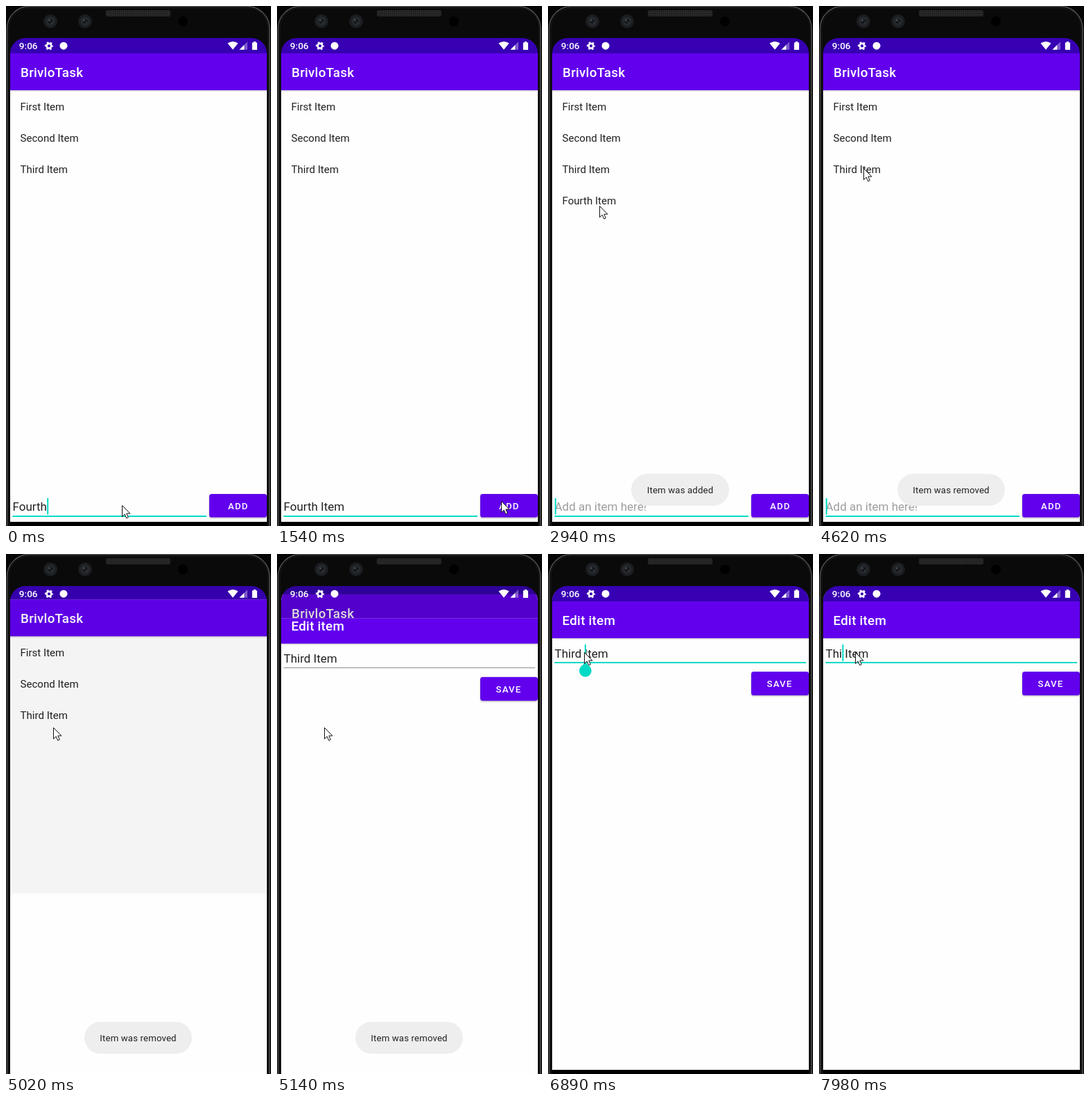
Animation, 382 px wide and 747 px high, one loop 8000 ms. Source, as an HTML page:

```html
<!DOCTYPE html>
<html lang="en">
<head>
<meta charset="utf-8">
<title>To-do list</title>
<style>
  html, body { margin: 0; width: 100%; height: 100%; overflow: hidden; background: #000; }
  svg { display: block; width: 100%; height: 100%; }
  text { font-family: Roboto, "Open Sans", sans-serif; fill: #212121; white-space: pre; }
  .title { font-size: 18.85px; font-weight: 500; letter-spacing: .23px; fill: #fff; }
  .row { font-size: 15.07px; }
  .field { font-size: 17px; }
  .hint { fill: #9e9e9e; }
  .label { font-size: 13.2px; font-weight: 500; letter-spacing: 1.18px; fill: #fff; }
  .toast { font-size: 13.2px; letter-spacing: .15px; text-anchor: middle; }
  .clock { font-size: 13.6px; font-weight: 500; fill: #fff; }
  .bar { fill: #6200ee; filter: drop-shadow(0 1px 1px rgba(0,0,0,.22)); }
  .button { fill: #6200ee; filter: drop-shadow(0 1px 1px rgba(0,0,0,.35)); }
</style>
</head>
<body>
<svg viewBox="0 0 382 747" preserveAspectRatio="none">
  <defs>
    <clipPath id="screen"><path d="M6 747V68a22 22 0 0 1 22-22H354a22 22 0 0 1 22 22V747z"/></clipPath>
    <clipPath id="reveal"><rect id="revealBox" x="0" y="46" width="382" height="701"/></clipPath>
    <pattern id="mesh" width="3" height="3" patternUnits="userSpaceOnUse">
      <rect width="3" height="3" fill="#2c2c2c"/><circle cx="1.5" cy="1.5" r=".9" fill="#151515"/>
    </pattern>
    <g id="camera">
      <circle r="10" fill="#1b1d20"/><circle r="6.5" fill="#262a2e"/>
      <circle r="3.6" fill="#15181b"/><circle cx="-1.6" cy="-1.6" r="1.3" fill="#4a5056"/>
      <circle cx="2" cy="2" r="1" fill="#3a4046"/>
    </g>
    <g id="chrome">
      <rect x="6" y="68" width="370" height="673" fill="#fefefe"/>
      <rect x="6" y="46" width="370" height="22" fill="#3700b3"/>
      <rect class="bar" x="6" y="68" width="370" height="53"/>
    </g>
  </defs>

  <!-- phone body -->
  <rect width="382" height="747" fill="#050505"/>
  <rect x="1.5" y=".5" width="378.5" height="800" rx="32" fill="#0a0a0a" stroke="#565656" stroke-width="1.4"/>
  <rect x="4" y="3" width="374" height="800" rx="29" fill="none" stroke="#1c1c1c"/>
  <rect x="144" y="6" width="93" height="9" rx="2" fill="url(#mesh)"/>
  <use href="#camera" x="64" y="22"/>
  <use href="#camera" x="114" y="22"/>
  <circle cx="255" cy="22" r="7" fill="#000"/>
  <rect x="6" y="741" width="370" height="6" fill="#000"/>

  <g clip-path="url(#screen)">
    <g id="home">
      <use href="#chrome"/>
      <text class="title" x="21" y="102">BrivloTask</text>
      <text class="row" x="20.5" y="149.5">First Item</text>
      <text class="row" x="20.5" y="194.7">Second Item</text>
      <text class="row" x="20.5" y="239.9">Third Item</text>
      <text class="row" x="20.5" y="285.1" id="fourth">Fourth Item</text>
      <text class="field" x="9.5" y="725" id="entry"></text>
      <rect x="9.5" y="732" width="279.5" height="2" fill="#03dac5"/>
      <rect id="homeCaret" y="707" width="2" height="23.5" fill="#03dac5"/>
      <rect class="button" x="293" y="701" width="83" height="33.5" rx="3.6"/>
      <rect id="ripple" x="293" y="701" width="83" height="33.5" rx="3.6" fill="#fff"/>
      <text class="label" x="320" y="723">ADD</text>
      <rect id="scrim" x="0" y="46" width="382" height="701"/>
    </g>
    <g id="edit" clip-path="url(#reveal)">
      <g id="editPage">
        <use href="#chrome"/>
        <text class="title" x="20.5" y="102">Edit item</text>
        <text class="field" x="9.5" y="148.5" id="value"></text>
        <rect id="line" x="9.5" width="362.5"/>
        <rect id="editCaret" y="130" width="2" height="24" fill="#03dac5"/>
        <path id="handle" d="M0 0L6.4 5.4A8.9 8.9 0 1 1 -6.4 5.4Z" fill="#03dac5"/>
        <rect class="button" x="293" y="169" width="83" height="34" rx="3.6"/>
        <text class="label" x="315.5" y="191">SAVE</text>
      </g>
    </g>
  </g>

  <!-- status icons -->
  <text class="clock" x="18.8" y="62.3">9:06</text>
  <g transform="translate(62 57.3)" fill="none" stroke="#fff">
    <circle r="3.4" stroke-width="2.6"/>
    <circle r="5.2" stroke-width="1.8" stroke-dasharray="2.7 2.745" stroke-dashoffset="1.35"/>
  </g>
  <circle cx="83" cy="57.2" r="5.5" fill="#fff"/>
  <path d="M319.5 53.6Q327 48.4 334.5 53.6L327 62.8z" fill="#fff"/>
  <path d="M348 51.2V62.8H336.4z" fill="#fff" opacity=".35"/>
  <path d="M343.3 55.9V62.8H336.4z" fill="#fff"/>
  <path d="M354.8 52.4H356.8V51H360V52.4H362V63H354.8z" fill="#fff"/>

  <g id="added">
    <rect x="120" y="672" width="141" height="46" rx="23" fill="#eee"/>
    <text class="toast" x="190.5" y="700">Item was added</text>
  </g>
  <g id="removed">
    <rect x="113" y="672" width="155" height="46" rx="23" fill="#eee"/>
    <text class="toast" x="190.5" y="700">Item was removed</text>
  </g>
  <path id="mouse" d="M.5 .5V16.6L4.2 13.1L6.7 18.8L9.3 17.7L6.8 12.1H11.9z"
        fill="#fff" stroke="#111" stroke-width="1" stroke-linejoin="round"/>
</svg>
<script>
const LOOP = 8000, BLINK = 495, TEXT_X = 9.8;

const stamps = [
  0, 150, 290, 430, 570, 710, 1140, 1420, 1540, 1660, 1800, 1940, 2080, 2220, 2360,
  2510, 2660, 2940, 3220, 3650, 3790, 3930, 4080, 4220, 4620, 5020, 5140, 5290, 5420,
  5550, 5680, 5820, 5950, 6080, 6230, 6370, 6500, 6630, 6760, 6890, 7170, 7440, 7580,
  7800, 7980
];
// Time, x, y of the pointer.
const path = [
  [1140, 167, 717], [1420, 262, 721], [1540, 323, 711], [1800, 323, 711],
  [1940, 306, 640], [2080, 240, 480], [2220, 160, 360], [2360, 101, 300],
  [2660, 83, 290], [2940, 74, 287], [3930, 74, 287], [4220, 64, 233],
  [4620, 64, 233], [5020, 68, 249], [5290, 68, 249], [5680, 50, 160],
  [5950, 45, 145], [6080, 45, 145], [6370, 52, 141]
];
const keyTimes = [150, 290, 430, 570, 710];
const blinkStarts = [0, 640, 1640, 6620, 7440, 7800];

const ui = {};
document.querySelectorAll("svg [id]").forEach(el => ui[el.id] = el);
const pen = document.createElement("canvas").getContext("2d");

const clamp = v => Math.max(0, Math.min(1, v));
const last = (list, t) => list.filter(v => v <= t).pop();
const set = (el, name, v) => el.setAttribute(name, v);
const show = (el, on) => set(el, "visibility", on ? "visible" : "hidden");
const move = (el, x, y) => set(el, "transform", `translate(${x} ${y})`);
const fade = (t, a, b, c, d) => clamp((t - a) / (b - a)) * clamp((d - t) / (d - c));

function caretX(text) {
  pen.font = "17px Roboto, 'Open Sans', sans-serif";
  return TEXT_X + pen.measureText(text).width;
}

function pointer(t) {
  const i = path.findIndex(p => p[0] > t);
  if (i === 0) return path[0].slice(1);
  if (i < 0) return path[path.length - 1].slice(1);
  const [a, b] = [path[i - 1], path[i]];
  const k = (t - a[0]) / (b[0] - a[0]);
  return [a[1] + (b[1] - a[1]) * k, a[2] + (b[2] - a[2]) * k];
}

function drawHome(t, caretOn) {
  const typed = t < 1800 ? "Fourth Item".slice(0, 6 + keyTimes.filter(k => k <= t).length) : "";
  ui.entry.textContent = typed || "Add an item here!";
  set(ui.entry, "class", typed ? "field" : "field hint");
  set(ui.homeCaret, "x", caretX(typed));
  show(ui.homeCaret, caretOn);
  show(ui.fourth, t >= 1800 && t < 3650);
  set(ui.ripple, "opacity", .24 * fade(t, 1600, 1650, 1700, 1930));
}

function drawEdit(t, caretOn) {
  const focus = t >= 6620;
  const word = t < 7800 ? "Third" : t < 7980 ? "Thir" : "Thi";
  const x = caretX(t < 7440 ? "Third " : word);
  ui.value.textContent = word + " Item";
  set(ui.line, "y", focus ? 155 : 155.2);
  set(ui.line, "height", focus ? 2 : 1);
  set(ui.line, "fill", focus ? "#03dac5" : "#8c8c8c");
  set(ui.editCaret, "x", x);
  show(ui.editCaret, focus && caretOn);
  move(ui.handle, x + 1, 156);
  show(ui.handle, focus && t < 7580);
}

// The edit page is uncovered from below while both pages drift up.
function drawSwitch(t) {
  const rest = 1 - clamp((t - 4990) / 425);
  const eased = 1 - rest ** 3;
  const top = 46 + 695 * rest ** 6.2;
  set(ui.edit, "display", rest < 1 ? "inline" : "none");
  set(ui.revealBox, "y", top);
  set(ui.revealBox, "height", 747 - top);
  move(ui.editPage, 0, 28.5 * (1 - eased));
  move(ui.home, 0, -14 * eased);
  set(ui.scrim, "opacity", .2 * eased);
}

function draw(time) {
  const t = last(stamps, time);
  const caretOn = Math.floor((t - last(blinkStarts, t)) / BLINK) % 2 === 0;
  drawHome(t, caretOn);
  drawEdit(t, caretOn);
  drawSwitch(t);
  set(ui.added, "opacity", fade(t, 1720, 1930, 3740, 3930));
  set(ui.removed, "opacity", fade(t, 3890, 4090, 5880, 6150));
  move(ui.mouse, ...pointer(t));
}

const start = performance.now();
function tick() {
  draw((performance.now() - start) % LOOP);
  requestAnimationFrame(tick);
}
tick();
</script>
</body>
</html>
```
